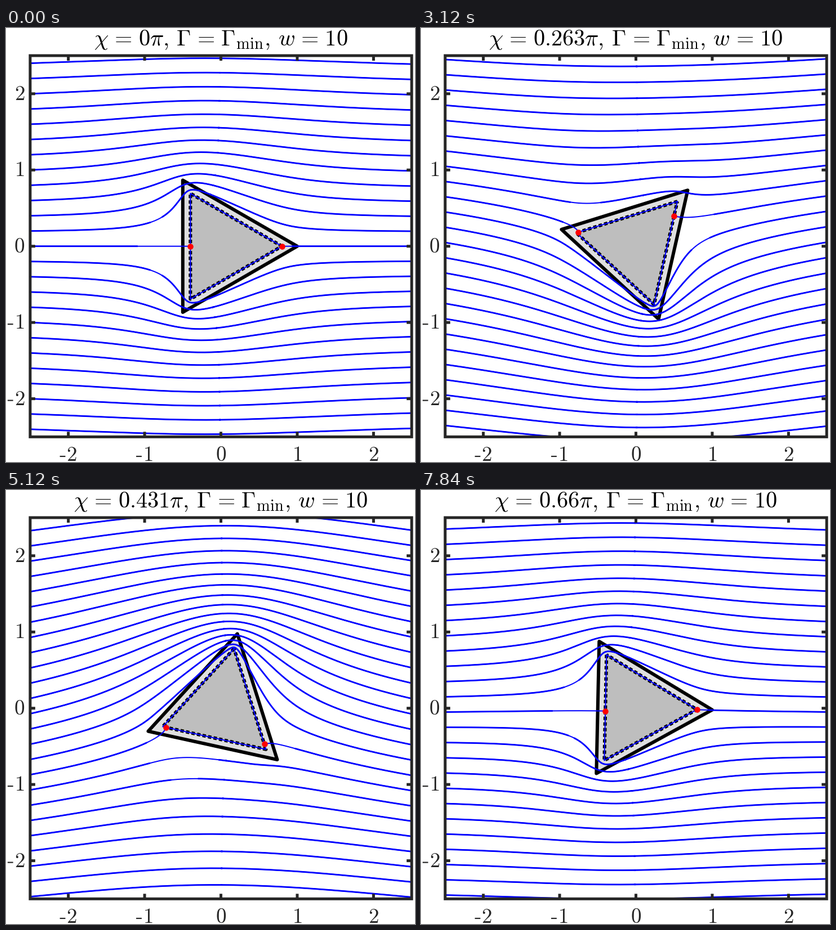
Animation, 726 px wide and 771 px high, one loop 7920 ms. Source, as a matplotlib script:

```python
import numpy as np
import matplotlib as mpl
import matplotlib.pyplot as plt
from matplotlib.animation import FuncAnimation
from matplotlib.patches import Polygon, Rectangle

mpl.rcParams["mathtext.fontset"] = "cm"
mpl.rcParams["path.snap"] = False

W, H, DPI = 726, 771, 100
FRAMES, STEP = 99, 80
CX, CY, UNIT = 381.5, 387.7, 135.45     # origin and scale of the plot in pixels
HALF = 2.5 * UNIT
DARK = "#262626"
PX = 72 / DPI                           # points per pixel

# Series of the map from the outside of the unit circle to that of a triangle
TERMS = 60
coef = [1.0]
for k in range(1, TERMS):
    coef.append(coef[-1] * (k - 5 / 3) / k)
coef = np.array(coef) / (1 - 3 * np.arange(TERMS))


def to_triangle(w):
    return w * np.polyval(coef[::-1], w ** -3.0)


SIZE = 0.8
C = SIZE / to_triangle(1.0)
CORNERS = np.exp(2j * np.pi * np.arange(3) / 3)
T = np.linspace(0, 1, 200) ** 2
R_MAX = 8.0


def pixels(z):
    return CX + UNIT * z.real, CY - UNIT * z.imag


def circulation(chi):
    """Sine of the stagnation angle on the circle."""
    x = 3 * chi
    return 0.544 * np.sin(x) + 0.0135 * np.sin(3 * x) - 0.0315 * np.sin(5 * x)


def place(zeta, chi):
    turn = np.exp(1j * chi)
    return C * turn * to_triangle(zeta / turn)


def unplace(z, chi):
    turn = np.exp(1j * chi)
    goal = z / turn / C
    w = goal
    for _ in range(8):
        w = goal - (to_triangle(w) - w)
    return w * turn


def stream(zeta, g):
    rho = abs(zeta)
    return C * (zeta.imag * (1 - rho ** -2) - 2 * g * np.log(rho))


def level_paths(levels, g):
    """Both halves of each streamline in the circle plane."""
    lv = levels[:, None]
    lo, hi = np.full_like(lv, 1 + 1e-9), np.full_like(lv, R_MAX)
    for _ in range(40):
        mid = (lo + hi) / 2
        inside = abs(lv + 2 * C * g * np.log(mid)) > C * (mid - 1 / mid)
        lo, hi = np.where(inside, mid, lo), np.where(inside, hi, mid)
    rho = hi + (R_MAX - hi) * T
    s = (lv + 2 * C * g * np.log(rho)) / (C * (rho - 1 / rho))
    phi = np.arcsin(np.clip(s, -1, 1))
    right = rho * np.exp(1j * phi)
    return -right.conj(), right


def speed(zeta, chi, g):
    w = zeta * np.exp(-1j * chi)
    return abs(1 - zeta ** -2.0 - 2j * g / zeta) / (abs(1 - w ** -3.0) ** (2 / 3) + 1e-9)


def streamlines(chi, g):
    left, _ = level_paths(np.zeros(1), g)
    z = place(left[0], chi)[::-1]
    y0 = np.interp(-2.5, z.real, z.imag)
    k = np.arange(-25, 26)
    y = y0 + 0.2 * k
    keep = abs(y) < 3.3
    k, y = k[keep], y[keep]
    levels = stream(unplace(-2.5 + 1j * y, chi), g)
    levels[k == 0] = 0
    zeta = np.vstack(level_paths(levels, g))
    gap = np.full((len(zeta), 1), np.nan)

    def flat(a):
        return np.hstack([a, gap]).ravel()

    x, y = pixels(place(zeta, chi))
    thick = np.where(speed(zeta, chi, g) < 0.68, np.nan, y)
    return flat(x), flat(y), flat(thick)


fig = plt.figure(figsize=(W / DPI, H / DPI), dpi=DPI, facecolor="white")
ax = fig.add_axes([0, 0, 1, 1])
ax.set(xlim=(0, W), ylim=(H, 0))
ax.axis("off")

window = Rectangle((CX - HALF, CY - HALF), 2 * HALF, 2 * HALF, fill=False,
                   ec=DARK, lw=5 * PX, joinstyle="miter", zorder=9)
ax.add_patch(window)


def line(color, width, z, **kw):
    art, = ax.plot([], [], color=color, lw=width * PX, zorder=z, **kw)
    art.set_clip_path(window)
    return art


outer = Polygon(np.zeros((3, 2)), fc="#dfdfdf", ec="black", lw=6 * PX,
                joinstyle="round", zorder=1)
inner = Polygon(np.zeros((3, 2)), fc="#bebebe", ec="none", zorder=2)
ax.add_patch(outer)
ax.add_patch(inner)
dotted = line("black", 6, 3, dashes=(1, 4 / 6), dash_capstyle="butt")
wall = line("blue", 2, 4)
thin = line("blue", 2, 4)
bold = line("blue", 2.8, 4)
dots = line("red", 0, 5, marker="o", ms=10.5 * PX, mew=0, ls="none")

# Ticks and their labels
EM = 37


def label(v, x, base):
    ax.text(x, base, rf"$\mathrm{{{abs(v)}}}$", fontsize=EM * PX, color=DARK,
            ha="center", va="baseline")
    if v < 0:
        ax.add_patch(Rectangle((x - 0.572 * EM, base - 0.245 * EM),
                               0.265 * EM, 0.058 * EM, fc=DARK, lw=0))


for v in range(-2, 3):
    tx, ty = CX + v * UNIT, CY - v * UNIT
    for side in (-1, 1):
        ex, ey = CX + side * HALF, CY + side * HALF
        for xs, ys in (([tx, tx], [ey, ey - 9 * side]),
                       ([ex, ex - 9 * side], [ty, ty])):
            ax.plot(xs, ys, color=DARK, lw=5 * PX, zorder=9,
                    solid_capstyle="butt")
    label(v, tx + (EM / 6 if v < 0 else 0), 769)
    label(v, 24, ty + 11)

title = ax.text(CX, 31, "", fontsize=40.4 * PX, ha="center", va="baseline")
EQ = r"\hspace{0.116}=\hspace{0.116}"
SEP = r",\hspace{0.179}"


def draw(i):
    turn = 2 * i / (3 * FRAMES)
    chi = turn * np.pi
    g = circulation(chi)

    tri = np.exp(1j * chi) * CORNERS
    outer.set_xy(np.column_stack(pixels(tri)))
    inner.set_xy(np.column_stack(pixels(SIZE * tri)))
    edge = pixels(SIZE * tri[[0, 1, 2, 0]])
    dotted.set_data(*edge)
    wall.set_data(*edge)

    x, y, y_bold = streamlines(chi, g)
    thin.set_data(x, y)
    bold.set_data(x, y_bold)

    a = np.arcsin(g)
    dots.set_data(*pixels(place(np.exp(1j * np.array([a, np.pi - a])), chi)))
    title.set_text(rf"$\chi{EQ}{round(turn, 3):g}\pi{SEP}"
                   rf"\Gamma{EQ}\Gamma_{{\mathrm{{min}}}}{SEP}w{EQ}10$")
    return outer, inner, dotted, wall, thin, bold, dots, title


anim = FuncAnimation(fig, draw, frames=FRAMES, interval=STEP, repeat=True,
                     repeat_delay=0, blit=False)
plt.show()
```
